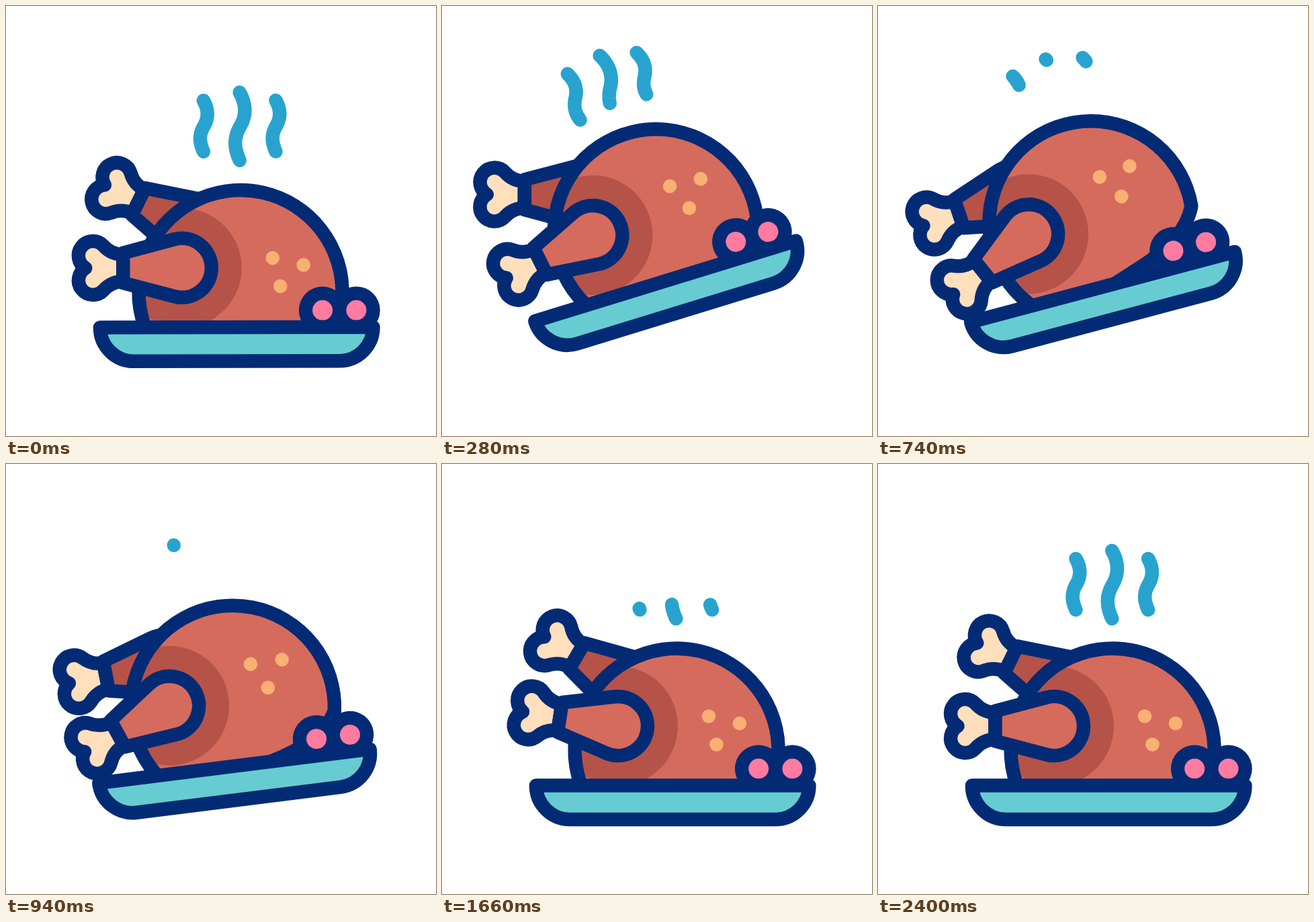
Animation, 640 px wide and 640 px high, one loop 2420 ms. Source, as an HTML page with a canvas:

```html
<!DOCTYPE html>
<html>
<head>
<meta charset="utf-8">
<style>
  html, body { margin: 0; width: 100%; height: 100%; overflow: hidden; background: #fff; }
  canvas { display: block; width: 640px; height: 640px; }
</style>
</head>
<body>
<canvas id="stage" width="640" height="640"></canvas>
<script>
const ctx = document.getElementById('stage').getContext('2d');
const LOOP = 2420;
const RAD = Math.PI / 180;
const NAVY = '#032b75', MEAT = '#d56b5d', SHADE = '#b55349', TEAL = '#67ccd1';
const STEAM = '#28a3cf', PINK = '#ff7ba0', BONE = '#ffdfbc', SPOT = '#f8b073';

const clamp = v => Math.min(1, Math.max(0, v));
const smooth = u => u * u * (3 - 2 * u);
const ramp = (t, from, to) => clamp((t - from) / (to - from));

// Eased interpolation through [time, value] keys
function track(t, keys) {
  for (let i = 1; i < keys.length; i++) {
    const [t0, v0] = keys[i - 1], [t1, v1] = keys[i];
    if (t < t1) return v0 + (v1 - v0) * smooth(ramp(t, t0, t1));
  }
  return keys[keys.length - 1][1];
}

const trayAngle = t => t < 540
  ? 19.4 * (1 - (1 - t / 540) ** 2.9)
  : 19.4 * (1 - ramp(t, 540, 1090) ** 1.45);

const bodyLift = t => t < 540
  ? 18 * smooth(ramp(t, 35, 520))
  : 18 * (1 - ramp(t, 540, 1120) ** 4);

const berrySlide = t => track(t, [[20, 0], [520, 20], [540, 20], [1030, 0]]);
const nearSwing = t => track(t, [[340, 0], [900, -7.6], [1630, 8.7], [2050, -1.7], [2380, 0]]);
const farSwing = t => track(t, [[0, 0], [140, 0.6], [380, 0], [920, -16.5],
  [1460, 15], [1800, -2], [2380, 0]]);

function spin(x, y, degrees) {
  ctx.translate(x, y);
  ctx.rotate(degrees * RAD);
  ctx.translate(-x, -y);
}

function paint(path, fill) {
  ctx.fillStyle = fill;
  ctx.fill(path);
  ctx.stroke(path);
}

function disc(x, y, r, fill) {
  ctx.fillStyle = fill;
  ctx.beginPath();
  ctx.arc(x, y, r, 0, 7);
  ctx.fill();
}

const trayPath = new Path2D(
  'M140 478.5H546.5A50.5 50.5 0 0 1 496 529H190.5A50.5 50.5 0 0 1 140 478.5Z');

// Relative to the dome centre
const bodyPath = new Path2D(
  'M-117 96A151.5 151.5 0 1 1 140 60C118 84 80 96 25 96Z');

// Relative to the hip, pointing left
const legPath = new Path2D('M-87.5 -22.3L-11.4 -42.5A44 44 0 1 1 -11.4 42.5L-87.5 22.3Z');
const bonePath = new Path2D(
  'M-87.5 -20A39 39 0 0 1 -116.8 -33.2A21.5 21.5 0 1 0 -143.5 0' +
  'A21.5 21.5 0 1 0 -116.8 33.2A39 39 0 0 1 -87.5 20Z');

function drawLeg(x, y, degrees, fill) {
  ctx.save();
  ctx.translate(x, y);
  ctx.rotate(degrees * RAD);
  paint(bonePath, BONE);
  paint(legPath, fill);
  ctx.restore();
}

function drawBody(t) {
  ctx.save();
  spin(208, 398.5, -bodyLift(t));
  ctx.translate(348.5, 425.5);
  drawLeg(-72.5, -95.5, 26.3 + farSwing(t), SHADE);
  ctx.fillStyle = MEAT;
  ctx.fill(bodyPath);
  ctx.save();
  ctx.clip(bodyPath);
  disc(-86.5, -35.5, 89, SHADE);
  ctx.restore();
  ctx.stroke(bodyPath);
  for (const [x, y] of [[48.5, -50], [94.5, -39.5], [60, -8]]) disc(x, y, 10.3, SPOT);
  drawLeg(-86.5, -35.5, nearSwing(t), MEAT);
  ctx.restore();
}

function drawBerries(t) {
  const shift = berrySlide(t);
  for (const x of [471.2, 521.5]) disc(x - shift, 453.5, 35.3, NAVY);
  for (const x of [471.2, 521.5]) disc(x - shift, 453.5, 15, PINK);
}

function bezier(a, b, c, d, u) {
  const v = 1 - u;
  return a * v * v * v + 3 * b * v * v * u + 3 * c * v * u * u + d * u * u * u;
}

function wavePoint(s) {
  return s < 0.5
    ? [bezier(0, 8, 7.5, 0, 2 * s), bezier(0, 14, 27, 39, 2 * s)]
    : [bezier(0, -6.5, -6.5, 0, 2 * s - 1), bezier(39, 51, 62, 76, 2 * s - 1)];
}

function drawWave(t, x, y, scale, delay) {
  const gone = smooth(ramp(t, delay, delay + 800));
  const grown = smooth(ramp(t, 1430 + delay, 2230 + delay));
  const from = grown > 0 ? 1 - grown : 0;
  const to = grown > 0 ? 1 : 1 - gone;
  if (to <= from) return;
  ctx.beginPath();
  for (let i = 0; i <= 40; i++) {
    const [px, py] = wavePoint(from + (to - from) * i / 40);
    ctx.lineTo(x + px * scale, y + py * scale);
  }
  ctx.stroke();
}

function drawSteam(t) {
  ctx.strokeStyle = STEAM;
  drawWave(t, 294.5, 141, 1, 160);
  drawWave(t, 348.3, 129, 1.33, 0);
  drawWave(t, 402.1, 141, 1, 80);
}

function draw(t) {
  ctx.fillStyle = '#fff';
  ctx.fillRect(0, 0, 640, 640);
  ctx.save();
  ctx.lineWidth = 20.5;
  ctx.lineJoin = ctx.lineCap = 'round';
  ctx.strokeStyle = NAVY;

  // The tray tips up around its left corner, which drifts slightly
  const angle = trayAngle(t);
  const rise = Math.sin(angle * RAD), drop = 1 - Math.cos(angle * RAD);
  ctx.translate(91 * drop - 19.4 * rise, -26.8 * rise - 35 * drop);
  spin(140, 478.5, -angle);

  drawBody(t);
  drawBerries(t);
  paint(trayPath, TEAL);
  drawSteam(t);
  ctx.restore();
}

function tick() {
  draw(performance.now() % LOOP);
  requestAnimationFrame(tick);
}
tick();
</script>
</body>
</html>
```
